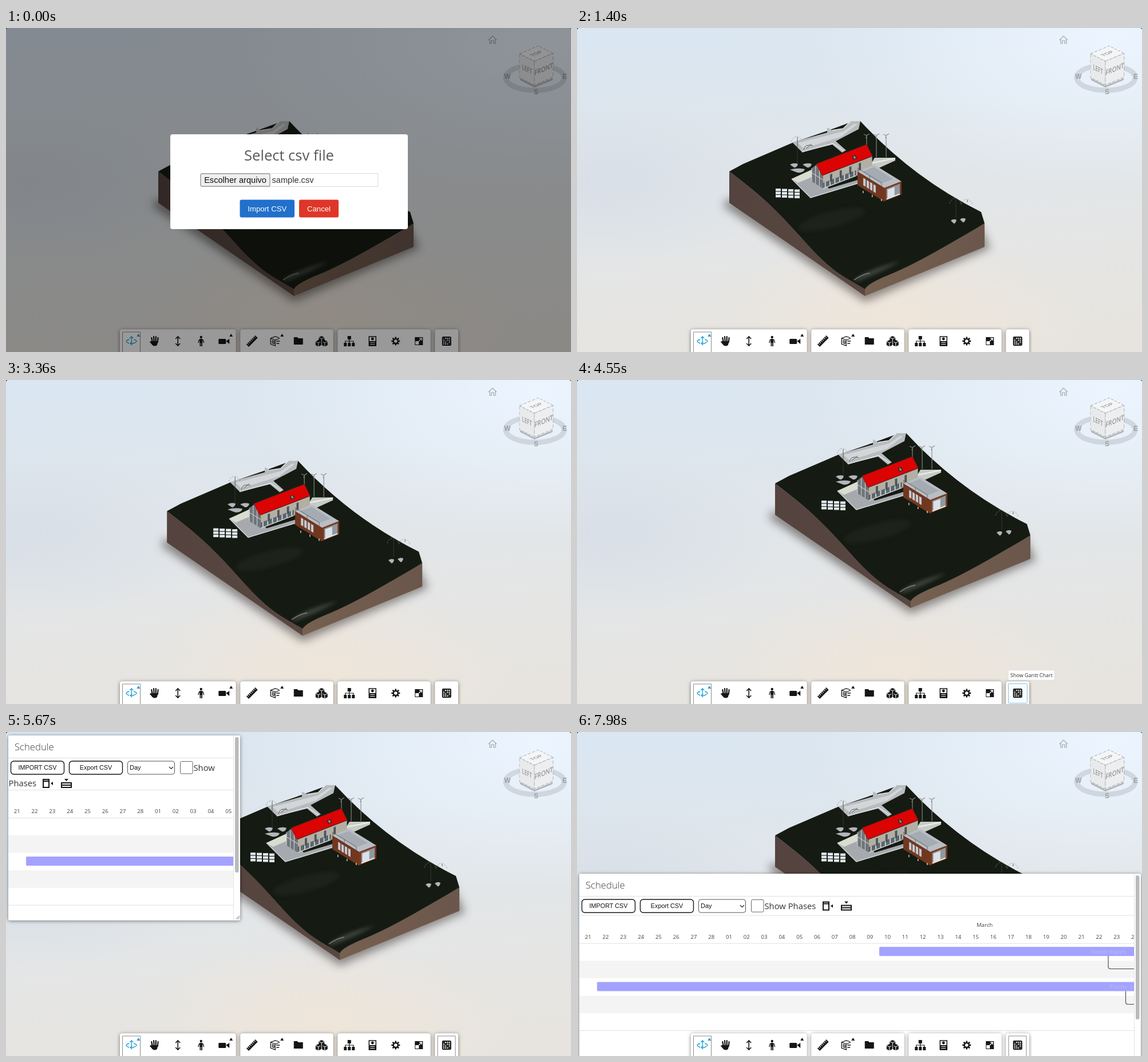
An HTML page for the animation above (8000 ms loop, 987x567 px).

```html
<!DOCTYPE html>
<html lang="en">
<head>
<meta charset="utf-8">
<title>Schedule viewer</title>
<style>
html, body { margin: 0; width: 100%; height: 100%; overflow: hidden; background: #222 }
svg { display: block; width: 987px; height: 567px; border-radius: 4px 4px 0 0 }
text { font-family: "Open Sans", sans-serif; white-space: pre }
.arial { font-family: "Liberation Sans", Arial, sans-serif }
.mid { text-anchor: middle }
</style>
</head>
<body>
<svg id="stage" viewBox="0 0 987 567" xmlns="http://www.w3.org/2000/svg"></svg>
<script>
const ink = '#161616';
const shape = (d, fill, more = '') => `<path d="${d}" fill="${fill}" ${more}/>`;
const line = (d, stroke = ink, width = 1, more = '') =>
  `<path d="${d}" fill="none" stroke="${stroke}" stroke-width="${width}" ${more}/>`;
const rect = (x, y, w, h, fill = ink, more = '') =>
  `<rect x="${x}" y="${y}" width="${w}" height="${h}" fill="${fill}" ${more}/>`;
const dot = (x, y, rx, ry, fill, more = '') =>
  `<ellipse cx="${x}" cy="${y}" rx="${rx}" ry="${ry}" fill="${fill}" ${more}/>`;
const text = (x, y, size, str, fill = '#333', more = '') =>
  `<text x="${x}" y="${y}" font-size="${size}" fill="${fill}" ${more}>${str}</text>`;
const group = (id, body) => `<g id="${id}">${body}</g>`;
const move = (x, y, body) => `<g transform="translate(${x} ${y})">${body}</g>`;
// Draws flat content on a plane spanned by two screen directions
const plane = (x, y, a, b, body) => `<g transform="matrix(${a} ${b} ${x} ${y})">${body}</g>`;
const repeat = (n, fn) => Array.from({ length: n }, (_, i) => fn(i)).join('');

const fade = (id, color) => `<radialGradient id="${id}"><stop stop-color="${color}"/>
  <stop offset="1" stop-color="${color}" stop-opacity="0"/></radialGradient>`;
const ramp2 = (id, a, b) => `<linearGradient id="${id}"><stop stop-color="${a}"/><stop offset="1" stop-color="${b}"/></linearGradient>`;
const blur = (id, size) => `<filter id="${id}" x="-30%" y="-60%" width="160%" height="220%"><feGaussianBlur stdDeviation="${size}"/></filter>`;
const defs = `<defs>
  <linearGradient id="sky" x1=".35" y1="0" x2=".5" y2="1">
    <stop stop-color="#dae6f1"/><stop offset=".5" stop-color="#e2e6e9"/><stop offset="1" stop-color="#e7e4df"/>
  </linearGradient>
  ${fade('glow', '#ecf5ff')}${fade('warm', '#efe6da')}${fade('cool', '#d8dfe7')}
  ${ramp2('soilLeft', '#54433e', '#594741')}${ramp2('soilRight', '#76604f', '#6b564c')}
  ${blur('shade', 8)}${blur('soft', 3)}
  <filter id="drop" x="-10%" y="-20%" width="120%" height="150%">
    <feDropShadow dx="0" dy="1" stdDeviation="3" flood-opacity=".5"/></filter>
</defs>`;

const sky = rect(0, 0, 987, 567, 'url(#sky)') + dot(930, 20, 520, 260, 'url(#glow)') +
  dot(40, 270, 330, 150, 'url(#cool)') + dot(560, 500, 330, 130, 'url(#warm)');

// Terrain: a sloping top and two cut faces meeting at the near corner
const leftEdge = 'C330 300 350 320 400 376S470 436 503 457';
const rightEdge = 'Q508 447 545 432T638 385T712 342';
const topFace = `M266 251${leftEdge}${rightEdge}L706 322Q586 262 495 163L475 166L437 180L376 201L290 238Z`;
const leftFace = `M266 251${leftEdge}V469L266 306Z`;
const rightFace = `M503 457${rightEdge}V383L503 469Z`;
const terrain =
  shape('M260 300L700 340L722 385L503 479L256 312Z', '#3d3531', 'opacity=".55" filter="url(#shade)"') +
  shape(leftFace, 'url(#soilLeft)') + shape(rightFace, 'url(#soilRight)') + shape(topFace, '#151b12') +
  dot(445, 335, 60, 14, '#262a24', 'opacity=".5" filter="url(#soft)" transform="rotate(-15 445 335)"') +
  shape('M484 443Q500 425 565 408Q530 428 490 443Z', '#555957', 'opacity=".7" filter="url(#soft)"') +
  line('M484 441Q498 431 511 429', '#8a8d8b', 2, 'opacity=".7"') +
  shape(leftFace + rightFace + topFace, '#fffafa', 'id="highlight"');

const U = [.93, -.36], V = [.84, .52], DOWN = [0, 1], SLOPE = [.5, 1];
const tree = (x, y, h) => line(`M${x} ${y}v${h}`, '#39403d', .8) +
  line(`M${x - 11} ${y + 8}q4 -10 11 -9q6 1 9 10`, '#8a8f8c', .7, 'stroke-dasharray="3 2"');
const pad = (x, y, w) => shape(`M${x - w} ${y}q${w} -4 ${2 * w} -1q-2 7 ${-w} 6z`, '#b2b5ba');

const road =
  shape('M376 200L437 183V174L446 179L465 176L478 163H495L492 177L452 198L470 214L463 218L446 204L393 217Z', '#b9bcbf') +
  shape('M386 201L465 181L484 168H490L462 190L396 211Z', '#d3d6d9') +
  line('M393 217L447 202L466 215M446 179L465 176L478 163', '#e6e7e8', 1.3) +
  line('M396 213q2 -11 16 -7M400 211l10 -8', '#55595c');
const terrace = shape('M375 264L412 247L440 281L490 266V272L408 297Z', '#a6aaaf') +
  shape('M375 264L412 247V260L386 271Z', '#d9dccf') + line('M375 264L408 297L490 272', '#d7d9db', 1.4) +
  shape('M512 240L520 227H556V232L523 247Z', '#c9cbc6') + line('M516 236L556 228', '#eef0ea', 2);
const house =
  plane(410, 245.5, V, DOWN, shape('M0 0L12 -14L24 0V23H0Z', '#6f7579') +
    line('M0 0V23M8 -8V23M16 -8V23M0 8H24', '#d4d7d7', 1.2)) +
  plane(430, 258, U, DOWN, rect(0, 0, 92, 23, '#b4afa5') + rect(0, 13, 62, 10, '#5d666d') +
    repeat(7, i => rect(3 + i * 9, 13, 2, 9, '#cfd4d8')) + repeat(4, i => rect(13 + i * 18, 3, 4, 13, '#4b5358')) +
    rect(0, 22, 62, 1.5, '#d8d8d6')) +
  plane(418, 238, U, SLOPE, rect(0, 0, 94.5, 20, '#dc0303', 'stroke="#6b2420" stroke-width=".7"') +
    rect(62, 9, 7, 6, '#3b2a2c') + rect(64, 10, 3, 4, '#8d9097'));
const annex =
  plane(490, 251, U, V, rect(0, 0, 32, 56, '#b9bec4') + rect(5, 4, 22, 40, '#a5abb2')) +
  plane(490, 251, V, DOWN, rect(0, 0, 56, 24, '#71371f') + repeat(4, i => rect(12 + i * 7, 5, 5, 13, '#c2cad1')) +
    line('M0 -6H50M1 -6V0M25 -6V0M50 -6V0', '#575d61', .8)) +
  plane(537, 280, U, DOWN, rect(0, 0, 32, 23, '#7c3b22') + rect(4, 3, 25, 19, '#8f999f') +
    rect(6, 5, 13, 15, '#dbe2e7') + rect(4, 20, 25, 2, '#eee')) +
  repeat(3, i => rect(499 + i * 16, 285 + i * 7, 1.5, 4, '#ccc'));
const buildings = road + tree(385, 191, 47) + pad(385, 248, 13) + pad(402, 239, 8) + pad(379, 239, 7) +
  repeat(12, i => rect(347 + i % 4 * 11, 281 + (i >> 2) * 5.5 + i % 4 * .5, 9, 4.4, '#e3eaf2')) +
  repeat(3, i => move(506 + 17 * i, 188, line('M0 38V0l-5 -2m5 2l5 -3m-5 3l-1 5', '#888c8c', 1.1))) +
  terrace + house + annex + tree(662, 299, 33) + tree(682, 301, 4) + pad(658, 337, 5) + pad(674, 335, 5);

// View cube
const cubeFace = (name, x, y, a, b, fill) => plane(x, y, a, b,
  rect(0, 0, 40, 40, fill, 'stroke="#a3a6a9" stroke-dasharray="6 3"') +
  text(20, 24, 12, name, '#94979a', 'font-weight="600" class="mid"'));
const east = [.82, -.34], south = [.65, .33], tall = [0, 1.04];
const cube = line('M843 21l7 -7l7 7M845 20v7h3v-5h4v5h3v-7', '#a3a6a9', 1.2) +
  dot(924, 87, 51, 22, 'none', 'stroke="#b9bec5" stroke-opacity=".5" stroke-width="9"') +
  shape('M898 88L923 101L955 88V91L923 104L898 91Z', '#b0b3b5') +
  cubeFace('TOP', 897, 45, east, south, '#f4f5f6') + cubeFace('LEFT', 897, 45, south, tall, '#e8eaec') +
  cubeFace('FRONT', 923, 58, east, tall, '#eceef0') +
  [['W', 876, 89], ['E', 976, 89], ['S', 926, 116]].map(([s, x, y]) =>
    text(x, y, 12, s, '#9a9fa5', 'font-weight="700" class="mid arial"')).join('');

// Toolbar icons, each centred on 0,0
const blue = '#1ca0d8';
const corner = fill => shape('M9 -8H15L12 -13Z', fill);
const isoCube = (x, y) => plane(x, y - 5, [.9, .45], [-.9, .45], rect(0, 0, 5, 5)) +
  plane(x - 5, y - 2, [.9, .45], DOWN, rect(0, 0, 5, 6)) + plane(x + .5, y + .3, [.9, -.45], DOWN, rect(0, 0, 5, 6));
const icons = [
  line('M-4 4Q-14 0 -4 -3M4 -3Q14 0 3 4H-2M1 1L-2 4L1 7', blue, 1.4) + line('M0 2V-8M-3 -5L0 -8L3 -5', blue, 1.3) + corner(blue),
  repeat(4, i => line(`M${i * 3 - 4} 2L${i * 3.8 - 5.5} ${i % 3 ? -8 : -6}`, ink, 2.2, 'stroke-linecap="round"')) +
    shape('M-6 0H6L4 7Q0 10 -4 7L-9 1Z', ink),
  line('M0 -7V7M-4 -4L0 -8L4 -4M-4 4L0 8L4 4', ink, 1.6),
  dot(0, -7, 2.2, 2.2, ink) + rect(-2.5, -4, 5, 7) + line('M-3 -3L-5 3M3 -3L5 3', ink, 1.3) + line('M-1.300 2V9M1.300 2V9', ink, 1.8),
  rect(-10, -4, 13, 9, ink, 'rx="1.5"') + shape('M3 0L9 -4V5Z', ink) + corner(ink),
  `<g transform="rotate(-45)">${rect(-11, -3, 22, 6)}${repeat(6, i => rect(i * 3.4 - 9, -3, 1, 3, '#fff'))}</g>`,
  line('M7 -6L0 -8L-8 -5V5L0 8V-2L-8 -5M0 -2L8 -5M-5 -1L-2 0V4L-5 3ZM2 0H8M2 4H7', ink, 1.3) + corner(ink),
  shape('M-8 -7H-2L0 -5H8V6H-8Z', ink),
  isoCube(0, -4) + isoCube(-5.5, 3) + isoCube(5.5, 3),
  rect(-3, -9, 6, 6) + repeat(3, i => rect(i * 7 - 9.5, 3, 5, 6)) + line('M0 -3V3M-7 3V0H7V3', ink, 1.2),
  rect(-6, -8, 12, 16, '#fff', 'stroke="#161616" stroke-width="1.5"') + dot(0, -4, 2.4, 2.4, ink) + rect(-6, 0, 12, 8) +
    repeat(2, i => rect(-4, 2 + i * 3, 8, 1, '#fff')),
  dot(0, 0, 4, 4, 'none', 'stroke="#161616" stroke-width="2.4"') +
    repeat(8, i => rect(-1.3, -7.5, 2.6, 3, ink, `transform="rotate(${i * 45})"`)),
  rect(-7, -7, 14, 14) + rect(-6, 0, 6, 6, '#fff') + line('M0 0L5 -5M1 -5H5V-1', '#fff', 1.3),
  rect(-8, -8, 16, 16, ink, 'rx="2"') + repeat(16, i => rect(i % 4 * 3.3 - 6, (i >> 2) * 3.3 - 6, 2, 2, i * 7 % 5 ? '#fff' : '#555'))
];
const slot = 40.5;
let used = 0;
const buttons = [5, 4, 4, 1].map((count, g) => {
  const x = 199 + used * slot + g * 8, first = used;
  used += count;
  return [rect(x, 527.5, count * slot, 46, '#fff', 'rx="4" filter="url(#drop)"'),
    repeat(count, i => move(x + (i + .5) * slot, 548, icons[first + i]))];
});
const pressed = x => line(`M${x} 567V532h31V567`, '#8a8a8a');
const toolbar = buttons.map(b => b[0]).join('') + pressed(203.5) + group('active', pressed(754)) +
  group('hover', rect(753.5, 531.5, 33, 34, '#f8fcfe', 'rx="1" stroke="#86bfe0"')) +
  buttons.map(b => b[1]).join('') +
  group('tip', rect(753.5, 508, 80.5, 17, '#fff', 'rx="2" stroke="#ddd" stroke-width=".6"') +
    text(757, 520, 9, 'Show Gantt Chart'));

// Schedule panel: its frame and header layout depend on the docking
const arial = 'class="arial mid"';
function panel({ id, top = 6, right = 409, height, content = right, wide, thumb }) {
  const rule = y => line(`M4 ${y}H${content}`, '#e1e1e1');
  const rowY = i => 150 + i * 30.7, dayX = i => 19.3 + i * 30.78;
  const pill = (x, label) => rect(x, 51, 93, 23, '#fff', 'rx="5" stroke="#161616" stroke-width="1.4"') +
    text(x + 46.5, 66, 10.8, label, '#111', arial);
  const bar = (x, y, label, labelX) => rect(x, y, 1100, 16, '#a3a3ff', 'rx="2"') + text(labelX, y + 11.5, 9.6, label, '#bcbcf4');
  const link = (x, y) => line(`M${x} ${y}v19q0 4 4 4h60`, '#444', 1.1);
  const header = text(15, 31.5, 16.7, 'Schedule', '#3c3c3c', 'font-weight="300"') + rule(45.5) +
    pill(8.5, 'IMPORT CSV') + pill(110.5, 'Export CSV') +
    rect(212.5, 51, 82, 23, '#fff', 'rx="4" stroke="#555"') + text(216, 66, 11, 'Day', '#111', 'class="arial"') +
    line('M285 61l3.500 3.500l3.500 -3.500', '#222', 1.2) + rect(304.5, 51.5, 21.5, 21.5, '#fff', 'rx="2" stroke="#666"') +
    text(327.5, 67.5, 14.8, wide ? 'Show Phases' : 'Show') + (wide ? '' : text(4.5, 95, 14.8, 'Phases')) +
    move(wide ? 365 : 0, wide ? -27.5 : 0, line('M65 83H75V97H65ZM65 86H75M97 89H114V97H97ZM97 93H114', ink, 2) +
      shape('M78 90L82 87V93ZM102 82H109L105.500 86Z', ink));
  const chart = rule(101.5) + text(712, 121.5, 9.6, 'March', '#444', 'class="mid"') +
    repeat(32, i => text(dayX(i), 142, 9.6, String((i + 20) % 28 + 1).padStart(2, '0'), '#444', 'class="mid"')) +
    rule(150.5) + [1, 3].map(i => rect(4, rowY(i), 1000, 30.7, '#f4f4f4')).join('') + rule(rowY(5) - .5) +
    bar(528, 156.5, 'Timber Floors', 897) + bar(35, 218, 'Floors - Level', 931) + link(928, 172) + link(958.5, 234) +
    (thumb ? '' : rule(409.5) + rule(420.5) + rect(79, 412, 28, 7, '#bdbdbd', 'rx="3.5"'));
  const scrollbar = thumb ? line(`M${content + .5} ${top}v${height}`, '#e3e3e3') +
    rect(content + 3, top + 3, 6.5, thumb, '#bababa', 'rx="3"') : '';
  return group(id, `<clipPath id="${id}Clip">${rect(4, top, content - 4, height)}</clipPath>` +
    rect(4, top, right - 4, height, '#fff', 'rx="3" filter="url(#drop)"') +
    `<g clip-path="url(#${id}Clip)">${move(0, top - 6, header)}${move(0, wide ? 219.5 : 0, chart)}</g>` + scrollbar +
    line(`M${right - 7} ${top + height - 2}l6 -6m-3 6l3 -3`, '#666'));
}
const panels = panel({ id: 'float', height: 323.5, content: 397, thumb: 237 }) + panel({ id: 'left', height: 580 }) +
  panel({ id: 'bottom', top: 248, right: 985, height: 340, content: 973, wide: true, thumb: 252 });

const button = (x, w, label, fill) => rect(x, 300.5, w, 31, fill, 'rx="3"') + text(x + w / 2, 320.5, 13.15, label, '#fff', arial);
const dialog = rect(287, 186, 415, 166, '#fff', 'rx="4"') +
  text(494.5, 231.5, 25.6, 'Select csv file', '#595959', 'class="mid"') +
  rect(340, 254.5, 310, 23, '#fff', 'rx="2" stroke="#d9d9d9"') + rect(340, 255, 121, 22, '#efefef', 'rx="2" stroke="#767676"') +
  text(400.5, 271, 14.6, 'Escolher arquivo', '#111', arial) + text(464.5, 271, 14.6, 'sample.csv', '#333', 'class="arial"') +
  button(408.5, 95.5, 'Import CSV', '#2170cb') + button(512, 69, 'Cancel', '#de3628');

const $ = id => document.getElementById(id);
$('stage').innerHTML = defs + sky + group('model', terrain + buildings) + cube + panels + toolbar +
  rect(0, 0, 987, 567, '#000', 'id="dim"') + group('dialog', dialog);

const ramp = (t, from, to) => Math.min(1, Math.max(0, (t - from) / (to - from)));
const pulse = (t, a, b, c, d) => ramp(t, a, b) - ramp(t, c, d);
const opacity = (id, value) => $(id).setAttribute('opacity', value);
const show = (id, on) => $(id).setAttribute('visibility', on ? 'visible' : 'hidden');

function draw(t) {
  const pan = ramp(t, 2870, 3710);
  $('model').setAttribute('transform', `translate(${80 * pan ** 3.1} ${-70 * pan ** 2.2})`);
  opacity('highlight', .2 * (pulse(t, 1400, 1640, 1640, 1890) + pulse(t, 4790, 5110, 5390, 5670)));

  const closing = ramp(t, 200, 380);
  opacity('dim', .4 * (1 - ramp(t, 200, 700)));
  opacity('dialog', 1 - closing);
  $('dialog').setAttribute('transform', `translate(494.5 269) scale(${1 - closing / 2}) translate(-494.5 -269)`);

  const tip = pulse(t, 2000, 2100, 2220, 2310) + pulse(t, 4100, 4340, 4600, 4760);
  opacity('tip', tip);
  opacity('hover', tip);
  show('active', t >= 4620);
  show('float', t >= 4620 && t < 6650);
  show('left', t >= 6650 && t < 7560);
  show('bottom', t >= 7560);
}
function tick() {
  draw(performance.now() % 8000);
  requestAnimationFrame(tick);
}
tick();
</script>
</body>
</html>
```
